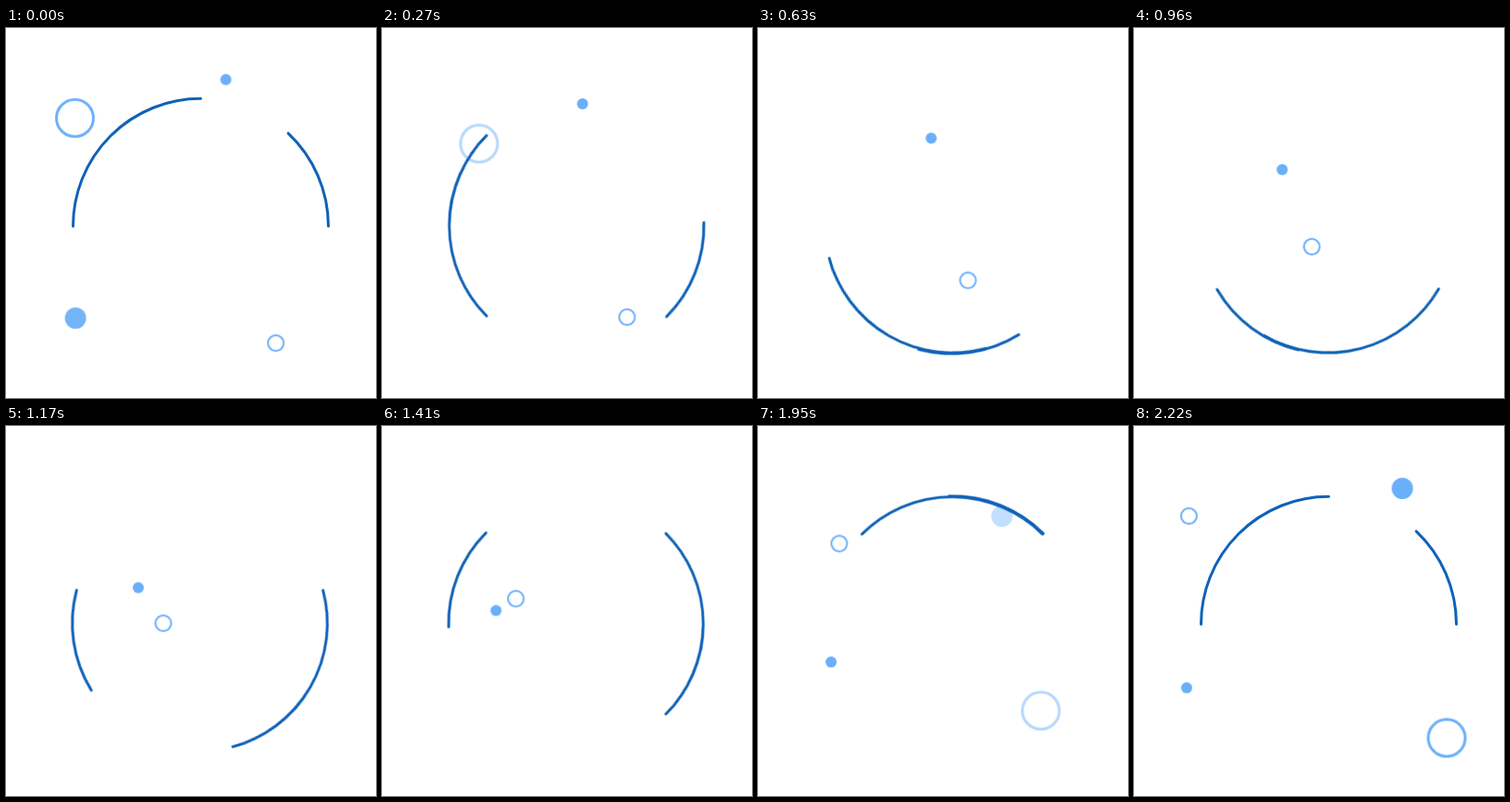
An HTML page that plays this animation: 400 px wide and 400 px high, repeating every 2250 ms.

```html
<!DOCTYPE html>
<html lang="en">
<head>
<meta charset="utf-8">
<title>Orbit loader</title>
<style>
  html, body { margin: 0; width: 100%; height: 100%; overflow: hidden; background: #fff; }
  svg { display: block; width: 100%; height: 100%; }

  .drift { animation: drift 2250ms linear infinite; }
  .disc { fill: #6aaff9; }
  .ring { fill: none; stroke: #6aaff9; }
  .fade-ring { animation: fade-ring 2250ms linear infinite; }
  .fade-disc { animation: fade-disc 2250ms linear infinite; }

  .arc {
    fill: none;
    stroke: #0f62b8;
    stroke-width: 3;
    stroke-linecap: round;
    transform-origin: 210px 213.8px;
    animation: spin 2250ms steps(25, end) infinite;
  }
  .ccw { --turn: -375deg; }
  .cw { --turn: 375deg; }

  @keyframes spin {
    from { transform: rotate(0deg); }
    to { transform: rotate(var(--turn)); }
  }
  @keyframes drift {
    from { transform: translate(0, 0); }
    to { transform: translate(var(--dx), var(--dy)); }
  }
  @keyframes fade-ring {
    0% { opacity: 1; }
    24%, 74.667% { opacity: 0; }
    98.667%, 100% { opacity: 1; }
  }
  @keyframes fade-disc {
    0% { opacity: 1; }
    12%, 78.667% { opacity: 0; }
    98.667%, 100% { opacity: 1; }
  }
</style>
</head>
<body>
<svg viewBox="0 0 400 400">
  <g class="drift" style="--dx: 269px; --dy: 244.8px">
    <circle class="ring fade-ring" cx="72.5" cy="95.5" r="20" stroke-width="3"/>
  </g>
  <g class="drift" style="--dx: 219.4px; --dy: -251.3px">
    <circle class="disc fade-disc" cx="73.5" cy="315.5" r="11.5"/>
  </g>
  <g class="drift" style="--dx: -184.5px; --dy: 232px">
    <circle class="disc" cx="239" cy="54" r="6"/>
  </g>
  <g class="drift" style="--dx: -237.2px; --dy: -248.4px">
    <circle class="ring" cx="293.5" cy="342.5" r="8.5" stroke-width="2"/>
  </g>
  <path class="arc ccw" d="M72.5 214.3A138 138 0 0 1 210.5 76.3"/>
  <path class="arc cw" d="M305.1 113.9A138 138 0 0 1 348.5 214.3"/>
</svg>
</body>
</html>
```
